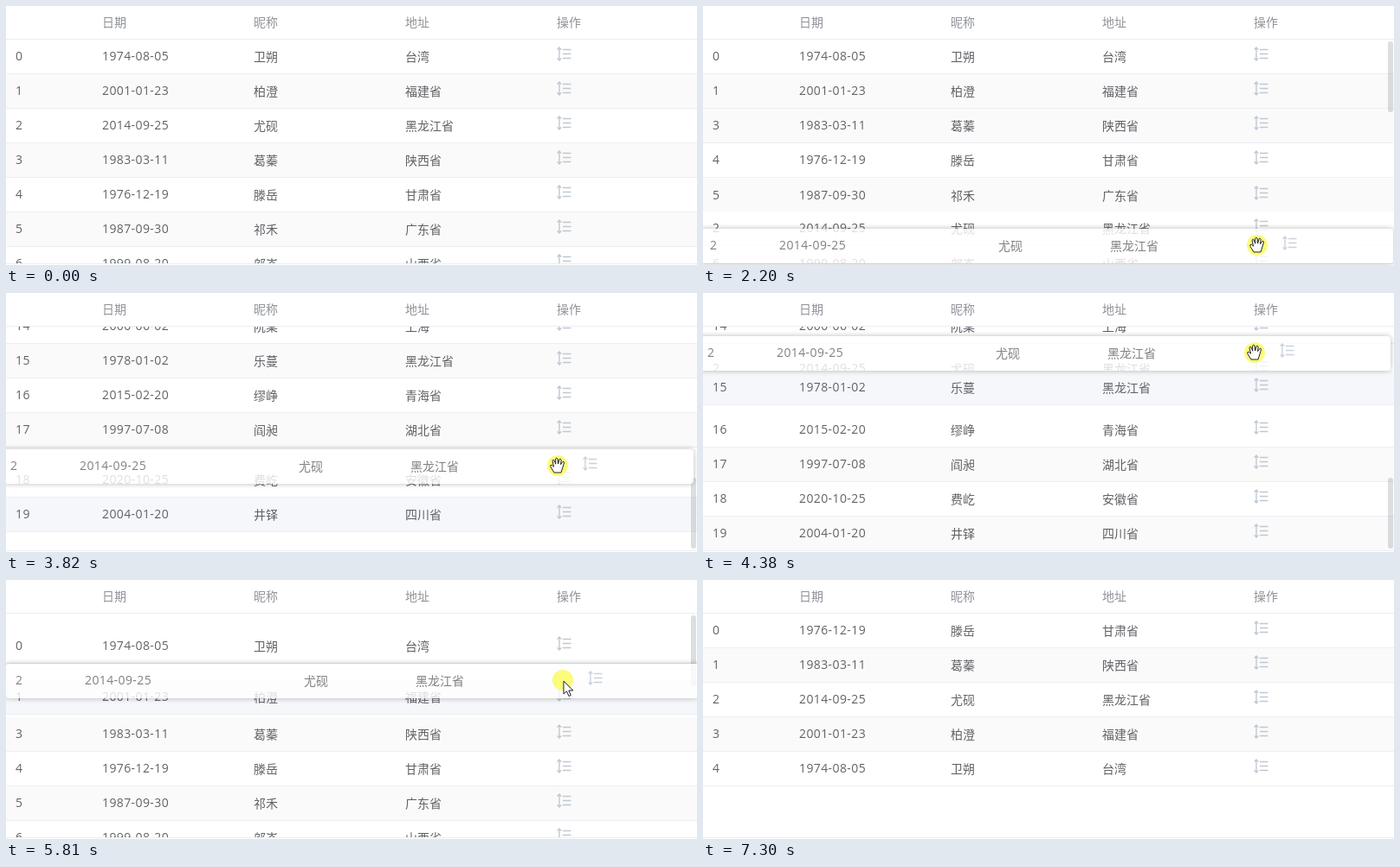
These frames come from a looping animation (798 by 300 pixels, 8.35 s). An HTML page:

```html
<!DOCTYPE html>
<html lang="zh">
<head>
<meta charset="utf-8">
<title>拖拽排序表格</title>
<style>
html, body { margin: 0; width: 100%; height: 100%; overflow: hidden; background: #fff; }
body { font: 14px/38px "Noto Sans CJK SC", "Noto Sans CJK", sans-serif; color: #606266; }
#stage { position: relative; width: 798px; height: 300px; overflow: hidden; background: #fff; }
#stage div, #stage svg { position: absolute; }
#head { left: 0; top: 0; width: 798px; height: 38px; line-height: 37px; border-bottom: 1px solid #ebeef5; color: #909399; }
#body { left: 0; top: 39px; width: 798px; height: 259px; overflow: hidden; isolation: isolate; }
#foot { left: 0; top: 298px; width: 798px; height: 1px; background: #ebeef5; }
.row { left: 0; top: 0; width: 800px; height: 40px; background: #fff; box-shadow: inset 0 -1px #ebeef5; }
.row.odd { background: #fafafa; }
.row.hover { background: #f5f7fa; }
.cell { top: 0; white-space: nowrap; }
.num { font-family: "Open Sans", "Noto Sans", sans-serif; letter-spacing: .4px; }
.c0 { left: 11px; } .c1 { left: 111px; } .c2 { left: 286px; } .c3 { left: 461px; } .c4 { left: 636px; }
.row svg { top: 8px; width: 17px; height: 17px; fill: none; stroke: #c0c8d2; stroke-width: 1.4; }
#ghost { box-shadow: 0 0 6px rgba(0, 0, 0, .35); border-radius: 4px; opacity: .8; }
#ghost .c1 { left: 91px; } #ghost .c2 { left: 344px; } #ghost .c3 { left: 473px; } #ghost .c4 { left: 672px; }
#thumb { left: 791px; top: 41px; width: 6px; height: 82px; border-radius: 3px; background: rgba(144, 147, 153, .3); }
#cursor { left: 0; top: 0; }
#spot { left: -12px; top: -12px; width: 24px; height: 24px; border-radius: 50%; }
#cursor svg { overflow: visible; fill: #fff; stroke: #222; stroke-width: 1; stroke-linejoin: round; }
#arrow { left: 1px; top: 1px; width: 12px; height: 19px; }
#hand { left: -9px; top: -10px; width: 18px; height: 19px; }
</style>
</head>
<body>
<div id="stage">
  <div id="head">
    <div class="cell c1">日期</div><div class="cell c2">昵称</div>
    <div class="cell c3">地址</div><div class="cell c4">操作</div>
  </div>
  <div id="body"></div>
  <div id="foot"></div>
  <div id="thumb"></div>
  <div id="cursor">
    <div id="spot"></div>
    <svg id="arrow"><path d="M0 0V15L3.5 11.8L6 17.5L8.3 16.5L5.9 11H10.8Z"/></svg>
    <svg id="hand"><path d="M5 18L1 11.5Q0 8.8 2.5 9.3L4.6 11.2L3.1 4.6Q3.4 2.6 5 3.8L6.8 8.2L6.6 2Q7.7 .2 9 2L9.6 8L11.2 2.6Q12.7 1.6 13.2 3.2L12.6 8.6L15 5.4Q16.8 5 16.5 6.8L14.6 13L13 18Z"/></svg>
  </div>
</div>
<script>
const LOOP = 8350, ROW = 40, DRAG = 2, LIFT = 1240, DROP = 6430, RELOAD = 6850;
const $ = id => document.getElementById(id);

const data = `1974-08-05 卫朔 台湾
2001-01-23 柏澄 福建省
2014-09-25 尤砚 黑龙江省
1983-03-11 葛蓁 陕西省
1976-12-19 滕岳 甘肃省
1987-09-30 祁禾 广东省
1999-08-20 邬岑 山西省
2007-01-11 骆汀 辽宁省
2003-04-15 裴若棠 辽宁省
1984-01-12 褚苓 贵州省
1989-03-05 窦屿 贵州省
2003-01-24 戚珩 湖北省
1994-06-30 鄢荞 山西省
2000-04-08 凌芷 香港特别行政区
2000-06-02 阮棠 上海
1978-01-02 乐蔓 黑龙江省
2015-02-20 缪峥 青海省
1997-07-08 阎昶 湖北省
2020-10-25 费屹 安徽省
2004-01-20 井铎 四川省`.split('\n').map(line => line.split(' '));

function makeRow(parent, item, index) {
  const el = document.createElement('div');
  el.className = 'row' + (index % 2 ? ' odd' : '');
  el.innerHTML = [index, ...item].map((text, i) =>
    `<div class="cell c${i}${i < 2 ? ' num' : ''}">${text}</div>`).join('') +
    '<svg class="c4"><path d="M3 1V16M.6 3.6L3 1L5.4 3.6M.6 13.4L3 16L5.4 13.4M7 3.5H16.5M7 8.5H16.5M7 13.5H16.5"/></svg>';
  parent.append(el);
  return el;
}

const rows = data.map((item, i) => makeRow($('body'), item, i));
const reloaded = data.slice(0, 5).reverse().map((item, i) => makeRow($('body'), item, i));
const ghost = makeRow($('stage'), data[DRAG], DRAG);
ghost.id = 'ghost';
$('stage').append($('cursor'));

// time, x, y of the pointer
const path = [
  [110, 825, 262], [760, 643, 137], [LIFT, 643, 137], [1440, 643, 165], [1700, 643, 78],
  [1800, 643, 78], [2150, 640, 277], [3000, 640, 277], [3660, 637, 277], [3820, 637, 200],
  [4150, 637, 110], [4400, 637, 68], [4600, 637, 64], [5560, 637, 64], [5810, 643, 116],
  [6050, 643, 185], [RELOAD, 643, 185], [7300, 700, 325]
];
const scroll = [[2300, 0], [3594, 540], [4450, 540], [5744, 0]];

// time, slot taken by the dragged row
const moves = [[1460, 3], [1520, 2], [1600, 1], [1700, 0], [1870, 1], [1935, 2], [1975, 3], [2020, 4], [2070, 5]];
for (let s = 6; s <= 19; s++) moves.push([2831 + 96 * (s - 11), s]);
moves.push([3779, 17], [3950, 16], [4100, 15], [4300, 14], [4500, 13], [4600, 12], [4700, 11], [4807, 10]);
for (let s = 9; s >= 2; s--) moves.push([4860 + 96 * (9 - s), s]);
moves.push([5700, 1], [5769, 0], [5870, 1], [5930, 2], [6010, 3]);

const clamp = x => Math.min(1, Math.max(0, x));
const smooth = x => x * x * (3 - 2 * x);
const settle = x => smooth(clamp(x) ** .6);

function sample(keys, t, ease) {
  if (t <= keys[0][0]) return keys[0].slice(1);
  for (let i = 1; i < keys.length; i++) {
    const [a, b] = [keys[i - 1], keys[i]];
    if (t <= b[0]) {
      const k = ease((t - a[0]) / (b[0] - a[0]));
      return a.slice(1).map((v, j) => v + (b[j + 1] - v) * k);
    }
  }
  return keys[keys.length - 1].slice(1);
}

// shown position, final slot of every row, and the row pushed aside last
function layout(t) {
  const pos = data.map((_, i) => i), slot = pos.slice();
  let pushed = -1;
  for (const [at, to] of moves) {
    if (at > t) break;
    const from = slot[DRAG], dir = Math.sign(from - to), k = settle((t - at) / 150);
    slot.forEach((s, i) => {
      if (i === DRAG || (s - from) * (s - to) > 0) return;
      slot[i] += dir;
      pos[i] += dir * k;
      if (at <= t - 50) pushed = i;
    });
    slot[DRAG] = to;
    pos[DRAG] += (to - from) * k;
  }
  return { pos, slot, pushed };
}

function spotColor(t) {
  if (t >= 980 && t < LIFT) return '#f0c898';
  if (t >= 2250 && t < 3660) return 'linear-gradient(#f0c898 7px, #fbfb7c 7px 15px, #f0c898 15px)';
  if (t >= 4450 && t < 5600) return '#fbe7a0';
  return '#fbfb7c';
}

const show = (el, on) => { el.style.display = on ? '' : 'none'; };
const place = (el, x, y) => { el.style.transform = `translate(${Math.round(x)}px, ${Math.round(y)}px)`; };

function draw(t) {
  const [x, y] = sample(path, t, smooth);
  const top = Math.round(sample(scroll, t, k => k)[0] / 10) * 10;
  const { pos, slot, pushed } = layout(t);
  const fresh = t >= RELOAD;
  const inside = t > 110 && t < 7300 && x < 798 && y < 298;
  let hover = -1;
  if (inside && (t < 1050 || fresh)) hover = Math.floor((y - 39) / ROW);
  else if (t > 3600 && t < 5900) hover = pushed;

  rows.forEach((el, i) => {
    show(el, !fresh);
    el.style.zIndex = slot[i];
    el.classList.toggle('hover', i === hover);
    place(el, 0, pos[i] * ROW - top);
  });
  reloaded.forEach((el, i) => {
    show(el, fresh);
    el.classList.toggle('hover', i === hover);
    place(el, 0, i * ROW);
  });

  show(ghost, t >= LIFT && t < DROP);
  place(ghost, x - 643, y - 19);

  $('thumb').style.opacity = fresh ? 0 : clamp((t - 150) / 250);
  place($('thumb'), 0, top * .32);

  const grab = (t >= 700 && t < 2250) || (t >= 3700 && t < 5600);
  show($('cursor'), t >= 110 && t < 7300);
  show($('hand'), grab);
  show($('arrow'), !grab);
  $('spot').style.background = spotColor(t);
  place($('cursor'), x, y);
}

const start = performance.now();
function tick() {
  draw((performance.now() - start) % LOOP);
  requestAnimationFrame(tick);
}
tick();
</script>
</body>
</html>
```
